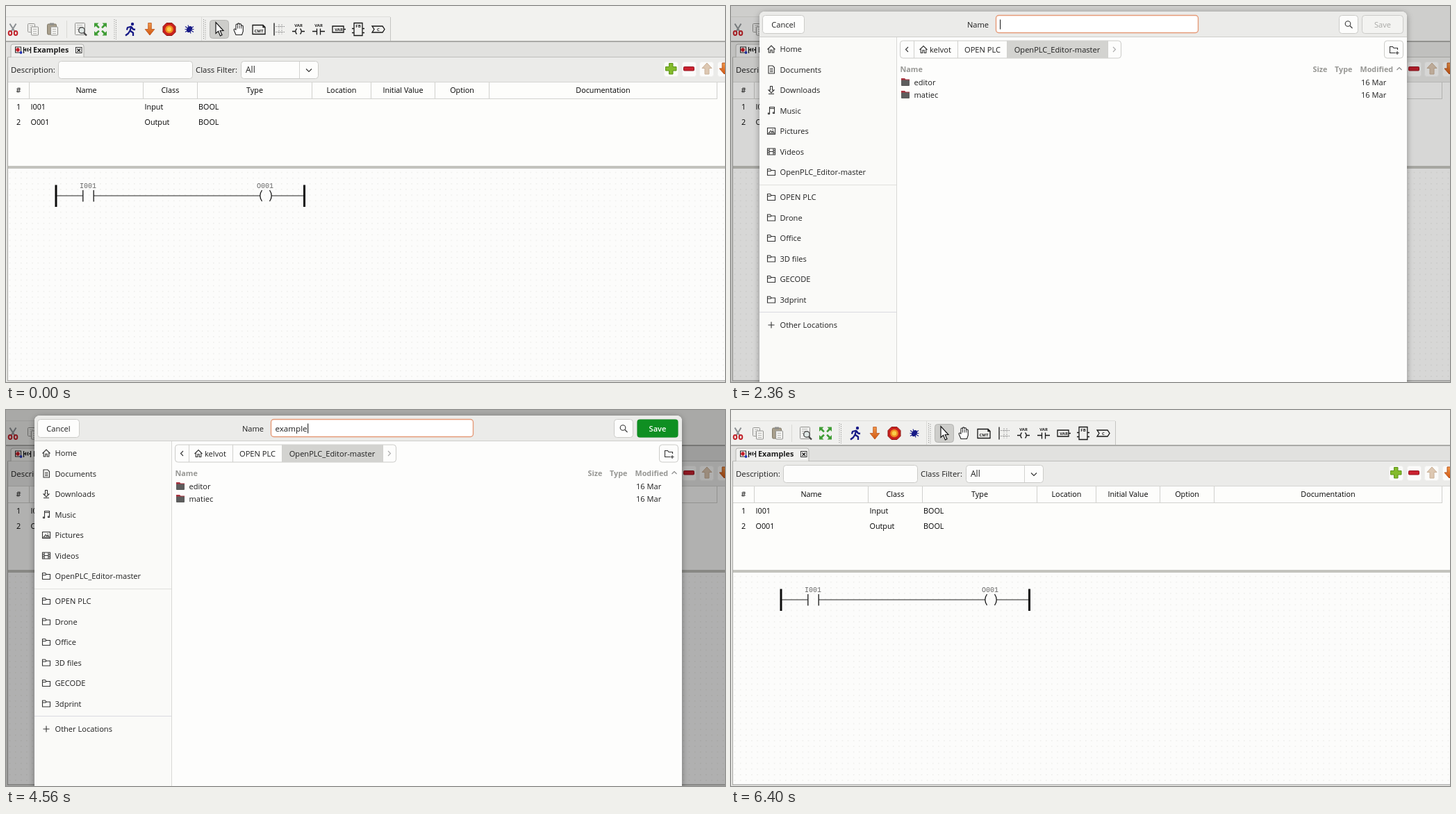
An HTML page for the animation above (6870 ms loop, 1035x541 px).

```html
<!DOCTYPE html>
<html lang="en">
<head>
<meta charset="utf-8">
<title>Save dialog</title>
<style>
html, body { margin: 0; width: 100%; height: 100%; overflow: hidden; background: #fcfcfb; }
svg { display: block; width: 100%; height: 100%; }
text { font-family: "Open Sans", "Noto Sans", sans-serif; font-size: 11.1px; fill: #1e1e1e; white-space: pre; }
.cell { font-size: 10.8px; fill: #000; }
.bold { font-weight: 700; font-size: 10.8px; }
.mono { font-family: "Liberation Mono", monospace; font-size: 10px; fill: #666; }
.tiny { font-size: 6px; font-weight: 700; fill: #222; }
.line { fill: none; stroke: #333; stroke-width: 1.1; }
.ink { fill: none; stroke: #161616; stroke-width: 1.3; }
</style>
</head>
<body>
<svg viewBox="0 0 1035 541" preserveAspectRatio="none">
  <defs>
    <pattern id="grid" x="2" y="236" width="8.15" height="8.15" patternUnits="userSpaceOnUse">
      <rect x="3" y="3" width="1" height="1" fill="#d9d9d3"/>
    </pattern>
    <linearGradient id="down" x1="0" y1="0" x2="0" y2="1">
      <stop offset="0" stop-color="#f39a4a"/><stop offset="1" stop-color="#cf5410"/>
    </linearGradient>
    <filter id="shadow" x="-5%" y="-5%" width="110%" height="110%">
      <feDropShadow dx="0" dy="2" stdDeviation="5" flood-color="#000" flood-opacity=".35"/>
    </filter>
  </defs>
  <g id="editor"></g>
  <rect id="dim" width="1035" height="541" fill="#000" opacity="0"/>
  <g id="dialog" display="none"></g>
</svg>
<script>
const LOOP = 6870, MID = 377.5;
const OPEN = 2141, TYPE = 3870, PRESS = 5000, CLOSE = 5098.5;
const el = id => document.getElementById(id);
const clamp = v => Math.max(0, Math.min(1, v));
const easeOut = p => 1 - (1 - p) * (1 - p);

const box = (x, y, w, h, fill, extra = '') =>
  `<rect x="${x}" y="${y}" width="${w}" height="${h}" fill="${fill}" ${extra}/>`;
const button = (x, y, w, h, fill = '#fdfdfc', stroke = '#cbcbc8', r = 4) =>
  box(x + .5, y + .5, w - 1, h - 1, fill, `stroke="${stroke}" rx="${r}"`);
const label = (s, x, mid, cls = '', anchor = 'start', extra = '') =>
  `<text x="${x}" y="${mid + 4}" class="${cls}" text-anchor="${anchor}" ${extra}>${s}</text>`;
const path = (d, cls = 'line', extra = '') => `<path d="${d}" class="${cls}" ${extra}/>`;
const shape = (d, fill, extra = '') => `<path d="${d}" fill="${fill}" ${extra}/>`;
const at = (x, y, s) => `<g transform="translate(${x} ${y})">${s}</g>`;
const vline = (x, y1, y2, c) => box(x, y1, 1, y2 - y1, c);

function toolbar() {
  const grip = x => path(`M${x} 19V48M${x + 2.5} 20V48`, '', 'stroke="#9a9a98" stroke-dasharray="1.3 1.7"');
  const tiny = (s, y) => `<text class="tiny" text-anchor="middle" y="${y}">${s}</text>`;
  const page = (x, y, w, h) => box(x, y, w, h, '#f1f1ef', 'stroke="#92928f" rx="1"');
  const lines = (x, y, w) => path(`M${x} ${y}h${w}m-${w} 3h${w}m-${w} 3h${w}`, '', 'stroke="#b5b5b2" stroke-width=".9"');
  const arrowDown = 'M-2.3-9H2.3V0H6.8L0 8.5L-6.8 0H-2.3Z';
  const corner = r => `<path transform="rotate(${r})" d="M9-9V-2.5L6.8-4.7L3-1.2L1.2-3L4.7-6.8L2.5-9Z" fill="#3f9d35"/>`;
  const icons = [
    [10, path('M-4.5-8L3 4M4.5-8L-3 4', '', 'stroke="#8b8f92" stroke-width="2"') +
      '<g fill="none" stroke="#c2242c" stroke-width="2"><ellipse cx="-4" cy="5.5" rx="2.3" ry="3"/><ellipse cx="4" cy="5.5" rx="2.3" ry="3"/></g>'],
    [39, page(-7.5, -8, 10, 12) + lines(-5, -5, 5) + page(-2.5, -3.5, 10, 12) + lines(0, 0, 5)],
    [67, box(-7.5, -7.5, 13, 15, '#a89f8c', 'stroke="#807968" rx="1.5"') + box(-4, -9, 6, 3, '#8d8d8b') +
      page(-2.5, -3.5, 10, 12) + lines(0, 0, 5)],
    [107, page(-7.5, -9, 14, 17) + lines(-5, -6, 8) +
      '<circle cx="2" cy="1.5" r="4.3" fill="#dfe7e5" stroke="#555" stroke-width="1.5"/>' +
      path('M5 5L9 9', '', 'stroke="#444" stroke-width="2.4"')],
    [136, [0, 90, 180, 270].map(corner).join('')],
    [179, '<circle cx="3" cy="-7.5" r="2.2" fill="#171a86"/>' +
      path('M1.5-4.5L-.5 2L4 5V9.5M-.5 2L-3 6L-7 9M1.5-4L-4-2.5L-5 1M1.5-3.5L4 0L7 .5', '', 'fill="none" stroke="#171a86" stroke-width="2.3" stroke-linejoin="round"')],
    [207, shape(arrowDown, 'url(#down)', 'stroke="#b9521b" stroke-width=".8"')],
    [235, shape('M-4-9H4L9-4V4L4 9H-4L-9 4V-4Z', '#c9211e', 'stroke="#8d1411"') +
      '<circle r="5.8" fill="#f08a20"/><circle r="3.2" fill="#f9cf4a"/>'],
    [264, path('M-6-4L6 4M-6 4L6-4M-6.5 0H6.5M-2-6L2 6', '', 'stroke="#20248e" stroke-width="1.1"') +
      '<ellipse rx="3.6" ry="5" fill="#171a86" transform="rotate(35)"/>'],
    [307, shape('M-5-10V6L-1.4 2.8L1.4 9.4L4 8.3L1.2 2H6Z', '#fff', 'stroke="#161616" stroke-width="1.2"')],
    [335, shape('M-4 8L-7 1C-7-1-5-1-4 1V-6C-4-8-1.5-8-1.5-6V-7.5C-1.5-9 1-9 1-7.5V-6.5C1-8.3 3.7-8.3 3.7-6.3V-4.5C3.7-6 6.3-6 6.3-4V3L4.5 8Z', '#fff', 'stroke="#222" stroke-width="1.1"') +
      path('M-1.5-6V-1M1.2-6V-1M3.8-5V-1', '', 'stroke="#222" stroke-width=".9"')],
    [364, path('M-9-6H6L9-3V7H-9ZM6-6V-3H9', 'ink', 'stroke-width="1"') + tiny('CMT', 4)],
    [393, path('M-7-9V9', 'ink', 'stroke-width="2"') +
      path('M-7-4H8M-7 4H8M0-7V-1M4-7V-1M0 1V7M4 1V7', '', 'fill="none" stroke="#888" stroke-dasharray="1.5 1.2"')],
    [421, tiny('VAR', -4) + path('M-9 3H-4M4 3H9M-2.5-1Q-6 3-2.5 7M2.5-1Q6 3 2.5 7', 'ink')],
    [450, tiny('VAR', -4) + path('M-9 3H-3M3 3H9M-2.5-1V8M2.5-1V8', 'ink')],
    [479, path('M-9-4.5H7V4.5H-9ZM7 0H10', 'ink', 'stroke-width="1"') + tiny('VAR', 2.2)],
    [507, path('M-6-9H6V9H-6ZM-9-1H-6M-9 5H-6M6-1H9M6 5H9', 'ink', 'stroke-width="1"') + tiny('FB', -2.5)],
    [536, path('M-9-4.5H6L9 0L6 4.5H-9L-6 0Z', 'ink', 'stroke-width="1"') + tiny('C', 2.2)]
  ];
  return box(0, 16, 553, 34, '#f0f0ee') + box(0, 15, 553, 1, '#dededb') + vline(553, 16, 50, '#c4c4c1') +
    vline(87, 21, 46, '#d8d8d5') + grip(156) + grip(284.5) +
    button(293, 20, 28, 27, '#cdcdca', '#b5b5b2') +
    vline(281, 16, 50, '#dcdcd9') +
    icons.map(([x, s]) => at(x, 33.5, s)).join('');
}

function buildEditor() {
  const edges = [2, 33, 197, 275, 440, 525, 617, 695, 1023];
  const heads = ['#', 'Name', 'Class', 'Type', 'Location', 'Initial Value', 'Option', 'Documentation'];
  const rows = [['1', 'I001', 'Input'], ['2', 'O001', 'Output']];
  let s = box(0, 0, 1035, 541, '#f2f2ef') + toolbar();

  // tab strip
  s += box(0, 50, 1035, 2, '#aaaaa7') + box(0, 52, 1035, 22, '#e1e1df') + box(0, 73, 1035, 1, '#bebebb') +
    shape('M7 74V58Q7 55 10 55H109Q112 55 112 58V74Z', '#f0f0ee', 'stroke="#b4b4b1"') +
    box(13.5, 59, 8, 8, '#fff', 'stroke="#222"') + '<circle cx="17" cy="63" r="2.8" fill="#c51f2a"/>' +
    '<circle cx="21.5" cy="67" r="1.9" fill="#2636b5"/>' +
    path('M25.5 59V68M35.5 59V68M25 63H28M28.5 60.5V65.5M32 60.5Q30 63 32 65.5M33 63H36', 'ink', 'stroke-width="1"') +
    label('Examples', 39, 63, 'bold') +
    box(100.5, 59.5, 8.5, 8, '#f6f6f4', 'stroke="#333"') + path('M102.5 61.5L107 66M107 61.5L102.5 66', 'ink');

  // description bar
  s += box(0, 74, 1035, 36, '#ebebe9') +
    label('Description:', 7, 92, '', 'start', 'style="font-size:11.4px"') + button(75, 79, 194, 26) +
    label('Class Filter:', 273, 92, '', 'start', 'style="font-size:11.4px"') + button(338, 79, 112, 26) +
    label('All', 345, 92, '', 'start', 'style="font-size:12px"') + vline(422, 80, 104, '#d2d2cf') +
    path('M432 90.5L436 94.5L440 90.5');
  [947, 973, 998, 1024].forEach(x => s += button(x, 80, 21, 22, '#fbfbfa', '#f0f0ee', 3));
  s += shape('M954.5 82.5H960V87.5H965V93H960V98H954.5V93H949.5V87.5H954.5Z', '#84bb2c', 'stroke="#5d9317"') +
    box(975.5, 87.5, 15, 5.5, '#cb2230', 'stroke="#95151f" rx="1"') +
    shape('M1009 82L1016 89.5H1012V98H1006V89.5H1002Z', '#ddc8b2', 'stroke="#c9b097"') +
    shape('M1031 82H1037V90H1041L1034 98L1027 90H1031Z', 'url(#down)', 'stroke="#b9521b"');

  // variable table
  s += box(2, 110, 1033, 121, '#fdfdfb') + box(2, 109, 1033, 1, '#d6d6d3') + box(2, 133, 1022, 1, '#d2d2cf');
  edges.slice(1).forEach(x => s += vline(x, 110, 133, '#d0d0cd'));
  heads.forEach((h, i) => s += label(h, (edges[i] + edges[i + 1]) / 2 + .5, 121, 'cell', 'middle'));
  rows.forEach(([n, name, cls], i) => {
    const y = 145 + 22 * i;
    s += label(n, 18, y, 'cell', 'middle') + label(name, 35.5, y, 'cell') +
      label(cls, 199.5, y, 'cell') + label('BOOL', 277, y, 'cell');
  });

  // ladder canvas
  s += box(2, 230, 1033, 4, '#c3c3bd') + box(3, 234, 1032, 305, '#fcfcfb') + box(3, 234, 1032, 305, 'url(#grid)') +
    box(0, 538.5, 1035, 1.5, '#b2b2af') + vline(2, 74, 540, '#a9a9a6') + box(0, 52, 2, 489, '#e4e4e1') +
    path('M72 257.5V289M429.5 257.5V289', '', 'stroke="#0c0c0c" stroke-width="3"') +
    path('M73 273H110.5M126 273H366M382 273H428', '', 'stroke="#222"') +
    path('M110.8 265V281.5M126.2 265V281.5', 'ink', 'stroke-width="1.6"') +
    path('M368.5 265Q363 273 368.5 281M379.5 265Q385 273 379.5 281', 'ink', 'stroke-width="1.5"') +
    label('I001', 118, 257.5, 'mono', 'middle') + label('O001', 373, 257.5, 'mono', 'middle');
  el('editor').innerHTML = s;
}

function buildDialog() {
  const folder = 'M-5.5-4.5H-1.5L0-2.5H5.5V4.5H-5.5Z M-5.5-1.5H-1L0-2.5';
  const home = 'M-5.5 .5L0-5L5.5 .5M-3.8-1V5H-1.2V1.2H1.2V5H3.8V-1';
  const places = [
    ['Home', 62, home],
    ['Documents', 91.5, 'M-4-5.5H2L4.5-3V5.5H-4ZM-2-1.5H2.5M-2 .8H2.5M-2 3H2.5'],
    ['Downloads', 121, 'M-1.5-5.5H1.5V0H4L0 4L-4 0H-1.5ZM-4 5.5H4'],
    ['Music', 150.5, 'M-2.5 3.5V-5H4.5V2.5M-2.5-3H4.5M-4.5 3.5H-2.5V5H-4.5ZM2.5 2.5H4.5V4H2.5Z'],
    ['Pictures', 180, 'M-5.5-4.5H5.5V4.5H-5.5ZM-4 3L-1-.5L1 1.5L2.5 0L4 3ZM1.5-2.2H3'],
    ['Videos', 209.5, 'M-5.5-4.5H5.5V4.5H-5.5ZM-3-4.5V4.5M3-4.5V4.5M-3 0H3M-5.5-1.5H-3M-5.5 1.5H-3M3-1.5H5.5M3 1.5H5.5'],
    ['OpenPLC_Editor-master', 239, folder],
    ...['OPEN PLC', 'Drone', 'Office', '3D files', 'GECODE', '3dprint'].map((n, i) => [n, 275 + 29.5 * i, folder]),
    ['Other Locations', 459, 'M-4.5 0H4.5M0-4.5V4.5']
  ];
  let s = `<g filter="url(#shadow)">${box(41, 8, 932, 739, '#fdfdfc', 'rx="8"')}</g>` +
    shape('M41 44V16Q41 8 49 8H965Q973 8 973 16V44Z', '#ebebe9', 'id="header"') + box(41, 44, 932, 1, '#cfcfcc') +
    box(41, 45, 197, 664, '#fafaf8') + vline(238, 45, 709, '#d9d9d6') +
    box(41, 257, 197, 1, '#e0e0dd') + box(41, 440, 197, 1, '#dadae0') + box(41, 709, 932, 1, '#d6d6d3');

  // header bar
  s += button(45, 13, 61, 27) + label('Cancel', 75.5, 26.5, '', 'middle') + label('Name', 340, 26.5) +
    box(381.5, 13.5, 291, 25, '#fff', 'id="entry" stroke-width="1.4" rx="4"') +
    '<text id="typed" x="387.5" y="30.5" style="font-size:11.6px"></text>' + box(387, 19.5, 1.1, 14, '#222', 'id="caret"') +
    button(875, 13, 28, 27) + '<circle cx="888" cy="25.5" r="3.8" class="line"/>' + path('M891 28.5L894.5 32', 'line', 'stroke-width="1.5"') +
    button(908, 13, 60, 27, '#f3f3f1') + label('Save', 938, 26.5, '', 'middle', 'style="fill:#a9a9a6"') +
    `<g id="go">${box(908.5, 13.5, 59, 26, '', 'id="face" rx="4"')}${label('Save', 938, 26.5, '', 'middle', 'style="fill:#fff;font-weight:600"')}</g>`;

  places.forEach(([name, y, icon]) => s += at(58, y, path(icon)) + label(name, 70.5, y));

  // path bar
  s += button(243, 49.5, 319, 26, '#fdfdfc') + box(397, 50, 145, 25, '#d3d3d0');
  [263, 326, 397, 542].forEach(x => s += vline(x, 50, 75, '#d0d0cd'));
  s += path('M255 59L251.5 62.5L255 66') + path('M550 59L553.5 62.5L550 66', 'line', 'style="stroke:#aaa"') +
    at(277, 62.5, path(home)) + label('kelvot', 286, 62.5) + label('OPEN PLC', 362, 62.5, '', 'middle') +
    label('OpenPLC_Editor-master', 469.5, 62.5, '', 'middle') +
    button(940, 49.5, 28, 26) + at(954, 63, path('M5.5 0V-2.5H0L-1.5-4.5H-5.5V4.5H2M5 2V7M2.5 4.5H7.5'));

  // file list
  const grey = 'style="fill:#979794"';
  s += label('Name', 243.5, 90.5, 'bold', 'start', grey) + label('Size', 858.5, 90.5, 'bold', 'end', grey) +
    label('Type', 869, 90.5, 'bold', 'start', grey) + label('Modified', 905.5, 90.5, 'bold', 'start', grey) +
    path('M958.5 92L962 88.5L965.5 92', 'line', 'style="stroke:#888"');
  ['editor', 'matiec'].forEach((name, i) => {
    const y = 110 + 18 * i;
    s += at(251, y - .5, shape('M-6-5.5H-1L.5-4H6V0H-6Z', '#a8323e') + box(-6, -3, 12, 8.5, '#5d5d5d', 'rx="1"')) +
      label(name, 263.5, y) + label('16 Mar', 907, y);
  });

  s += button(816, 712, 152, 29) + label('OpenPLC Program(*.st)', 825.5, 726) + path('M951 724.5L954.5 728L958 724.5');
  el('dialog').innerHTML = s;
}

buildEditor();
buildDialog();
const [dim, dialog, header, entry, typed, caret, go, face] =
  ['dim', 'dialog', 'header', 'entry', 'typed', 'caret', 'go', 'face'].map(el);

function draw(t) {
  const grow = easeOut(clamp((t - OPEN) / 100));
  const shrink = 1 - easeOut(clamp((t - CLOSE) / 100));
  const size = grow * shrink;
  dim.setAttribute('opacity', .3 * clamp((t - OPEN + 26) / 500) * (1 - clamp((t - CLOSE) / 250)));
  dialog.setAttribute('display', size > 0 ? 'inline' : 'none');
  if (size <= 0) return;
  dialog.setAttribute('opacity', grow);
  dialog.setAttribute('transform', `translate(0 ${MID}) scale(1 ${size}) translate(0 ${-MID})`);

  const focused = t > 2200 && t < CLOSE;
  header.setAttribute('fill', focused ? '#ebebe9' : '#f5f5f3');
  entry.setAttribute('stroke', focused ? '#e59a78' : '#d4d4d1');

  const count = t < TYPE ? 0 : Math.min(7, 1 + Math.floor((t - TYPE) / 100));
  typed.textContent = 'example'.slice(0, count);
  caret.setAttribute('x', 387 + (count ? typed.getComputedTextLength() + 1 : 0));
  const blink = Math.sin(Math.PI * clamp((t - 2860) / 570));
  caret.setAttribute('opacity', focused ? 1 - blink : 0);

  go.setAttribute('opacity', t < 3000 ? 1 - clamp((t - 2200) / 100) : clamp((t - TYPE) / 150));
  face.setAttribute('fill', t < PRESS ? '#0f8f22' : '#0b6b15');
}

function tick() {
  draw(performance.now() % LOOP);
  requestAnimationFrame(tick);
}
tick();
</script>
</body>
</html>
```
